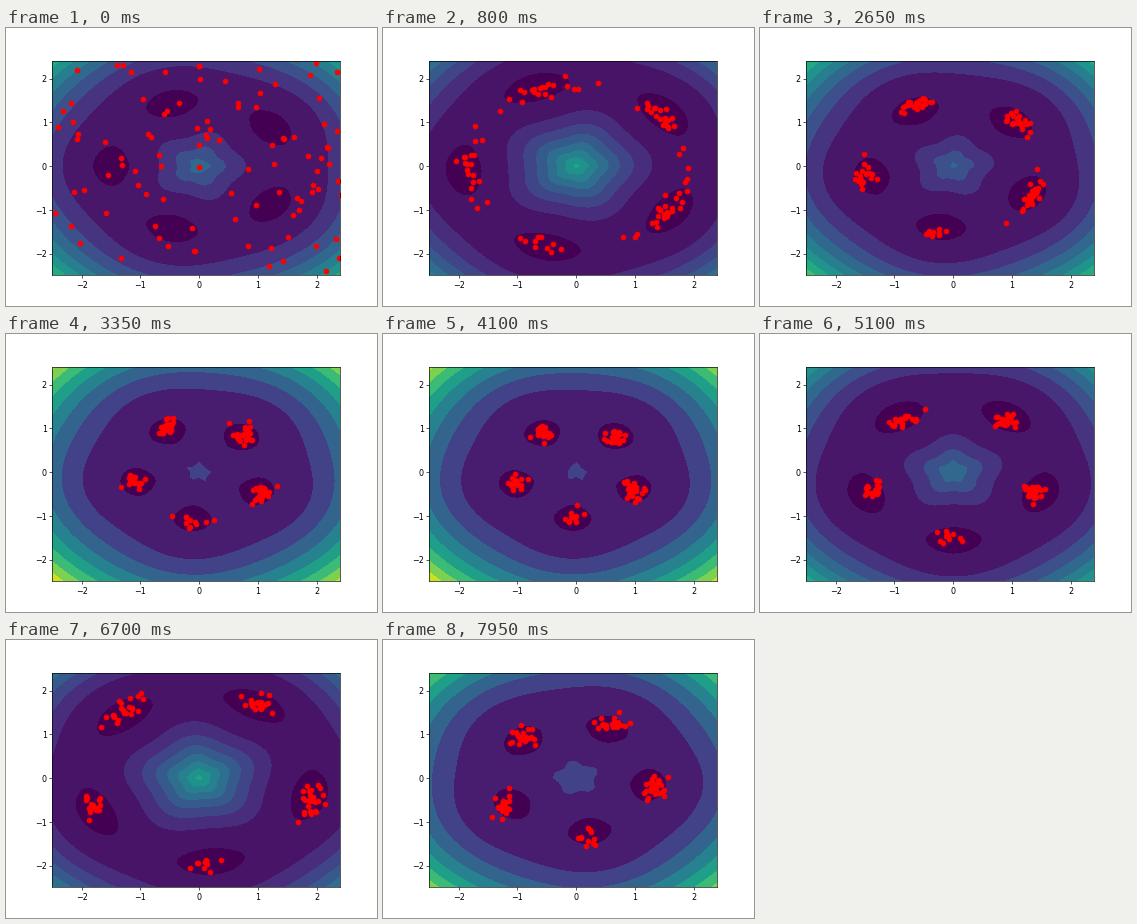
Animation, 371 px wide and 278 px high, one loop 8 s. Source, as a matplotlib script:

```python
import numpy as np
import matplotlib.pyplot as plt
from matplotlib.animation import FuncAnimation

FRAMES, INTERVAL = 160, 50
LOBES, DEPTH = 5, 0.1
RATE = 2 * np.pi / 100   # phase per frame
PARTICLES = 100
LEARN, NOISE = 0.1, 0.06


def ring(n):
    """Radius and rotation of the ring of minima."""
    t = RATE * n
    return 1.5 + 0.5 * np.sin(t), t / 20


def height(x, y, n):
    radius, turn = ring(n)
    angle = np.arctan2(y, x) - turn
    return (np.hypot(x, y) - radius) ** 2 + DEPTH * np.cos(LOBES * angle)


def slope(p, n):
    radius, turn = ring(n)
    x, y = p.T
    r = np.maximum(np.hypot(x, y), 0.15)
    angle = np.arctan2(y, x)
    radial = 2 * (r - radius)
    around = -DEPTH * LOBES * np.sin(LOBES * (angle - turn)) / r
    c, s = np.cos(angle), np.sin(angle)
    return np.column_stack([radial * c - around * s, radial * s + around * c])


def swarm():
    """Noisy gradient descent of every particle, for all frames."""
    rng = np.random.default_rng(4)
    p = rng.uniform(-2.5, 2.5, (PARTICLES, 2))
    path = [p]
    for n in range(1, FRAMES):
        p = p - LEARN * slope(p, n) + rng.normal(0, NOISE, p.shape)
        path.append(p)
    return path


axis = np.arange(-2.5, 2.5, 0.1)
X, Y = np.meshgrid(axis, axis)
path = swarm()

fig, ax = plt.subplots(figsize=(6.4, 4.8), dpi=58)
ax.set_xlim(axis[0], axis[-1])
ax.set_ylim(axis[0], axis[-1])
dots, = ax.plot([], [], "ro")
field = None


def draw(n):
    global field
    if field is not None:
        field.remove()
    field = ax.contourf(X, Y, height(X, Y, n), vmin=-DEPTH, vmax=6.5)
    dots.set_data(path[n][:, 0], path[n][:, 1])
    return [dots]


anim = FuncAnimation(fig, draw, frames=FRAMES, interval=INTERVAL,
                     init_func=lambda: draw(0), repeat=True, repeat_delay=0)
plt.show()
```
